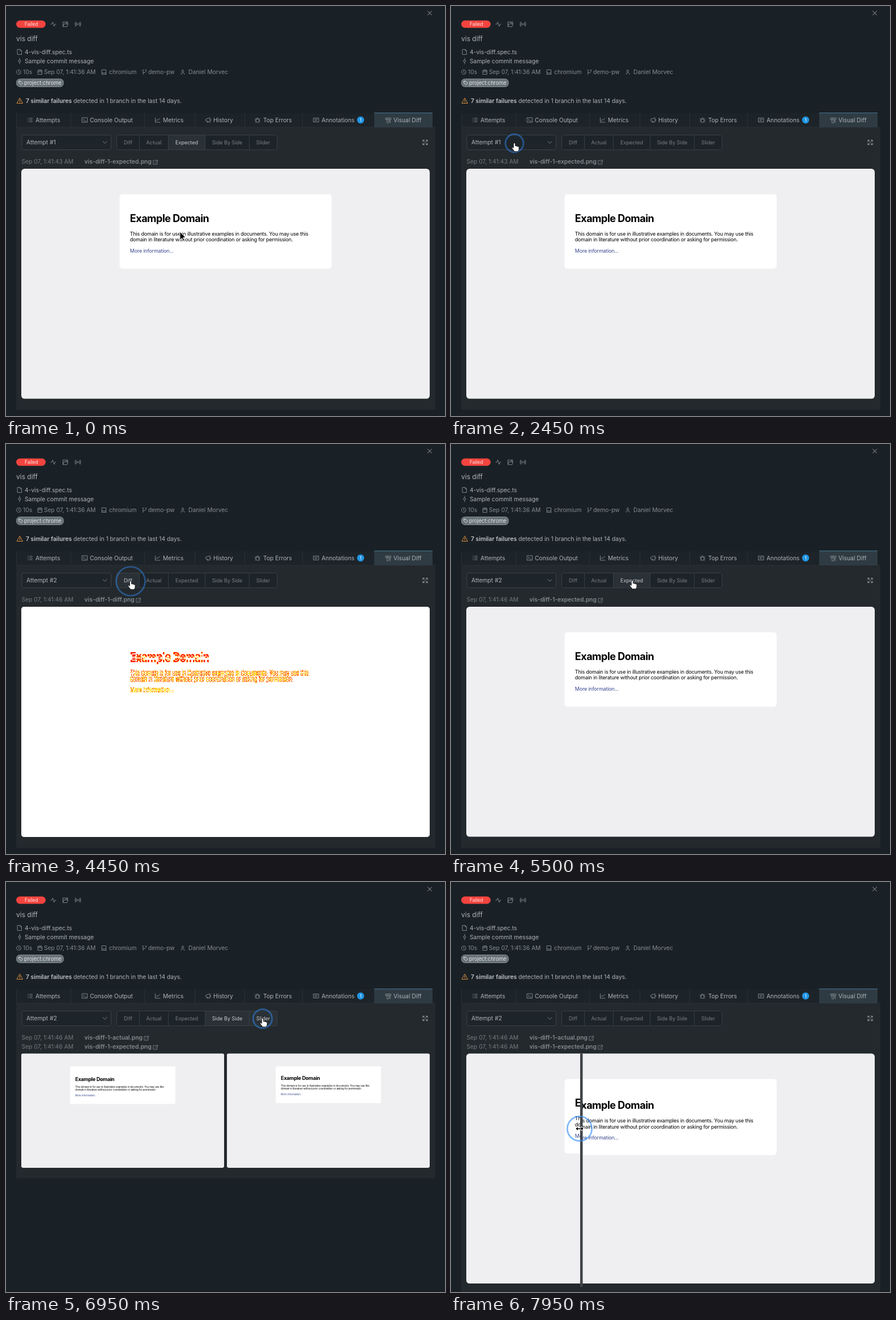
An HTML page with a canvas for the animation above (8 s loop, 775x723 px).

```html
<!DOCTYPE html>
<html lang="en">
<head>
<meta charset="utf-8">
<title>Visual diff</title>
<style>
html, body { margin: 0; width: 100%; height: 100%; overflow: hidden; background: #1a2126; }
#stage { position: relative; width: 775px; height: 723px; overflow: hidden; font: 10.3px Inter, sans-serif; }
#stage > svg, #diff { position: absolute; left: 0; top: 0; }
#diff { left: 27px; top: 287px; width: 721px; height: 405.6px; border-radius: 5px; background: #fff; }
svg text { white-space: pre; }
.ic path { fill: none; stroke: #7d8488; stroke-width: 1; stroke-linecap: round; stroke-linejoin: round; }
.label { position: absolute; left: 27.5px; height: 16px; line-height: 16px; color: #737a7e; white-space: pre; }
.label b { position: absolute; left: 111px; font-weight: 600; color: #858b8f; }
.label svg { vertical-align: -1.5px; margin-left: 2px; }
.btn text { font-size: 9px; text-anchor: middle; fill: #787e82; }
.btn rect { fill: #1d2429; }
.btn.lit text { fill: #c6cacc; }
.btn.lit rect { fill: #2a3136; }
</style>
</head>
<body>
<div id="stage">
<svg id="base" width="775" height="723">
  <rect width="775" height="723" fill="#1a2126"/>
  <rect x="18" y="189" width="735" height="26" fill="#1d2429"/>
  <rect id="panel" x="18" y="214" width="740" height="498" fill="#23292d"/>
  <path d="M18.500 189V214H758M114.500 189V214M244.500 189V214M333.500 189V214M421.500 189V214M523.500 189V214" fill="none" stroke="#2a3136"/>
  <rect x="650" y="188" width="103" height="26" fill="#2f3b43"/>
  <path d="M650 188.500H753" stroke="#457594"/>
  <rect x="18" y="25.500" width="52" height="13" rx="6.500" fill="#f4443f"/>
  <rect x="18.500" y="128.500" width="83" height="14" rx="6" fill="#687279" stroke="#828b91"/>
  <rect x="28" y="227.500" width="157.500" height="26" rx="3" fill="#1e252a" stroke="#3b4247"/>
  <circle cx="626" cy="201" r="6.200" fill="#2196e3"/>
  <g id="words"></g>
  <g id="icons" class="ic"></g>
  <g id="buttons"></g>
  <path d="M195.500 230.500a3 3 0 0 1 3-3H475.500a3 3 0 0 1 3 3V250.500a3 3 0 0 1-3 3H198.500a3 3 0 0 1-3-3ZM235.500 227.500v26M286.500 227.500v26M351.500 227.500v26M429.500 227.500v26" fill="none" stroke="#383f44"/>
  <defs>
    <g id="expected"></g>
    <g id="actual"></g>
    <clipPath id="leftPart"><rect id="leftBox" x="0" y="290" height="433"/></clipPath>
    <clipPath id="rightPart"><rect id="rightBox" y="290" width="775" height="433"/></clipPath>
  </defs>
  <use class="view v-expected" href="#expected" transform="translate(27 287) scale(.5633)"/>
  <use class="view v-actual" href="#actual" transform="translate(27 287) scale(.5633)"/>
  <g class="view v-side">
    <use href="#actual" transform="translate(27 302.500) scale(.2797)"/>
    <use href="#expected" transform="translate(390 302.500) scale(.2797)"/>
  </g>
  <g class="view v-slider">
    <g clip-path="url(#leftPart)"><use href="#expected" transform="translate(27 302.500) scale(.5633)"/></g>
    <g clip-path="url(#rightPart)"><use href="#actual" transform="translate(27 302.500) scale(.5633)"/></g>
    <rect id="bar" y="302.500" width="4.500" height="411.500" fill="#404447"/>
  </g>
</svg>
<canvas id="diff" class="view v-diff" width="1280" height="720"></canvas>
<div id="labels"></div>
<svg id="top" width="775" height="723">
  <g id="menu">
    <rect x="28" y="257" width="158" height="62" rx="3" fill="#2a3136"/>
    <rect id="opt" x="28" y="261" width="158" height="27" fill="#343c42"/>
    <text x="36" y="278" fill="#b4babe" font-size="10.3">Attempt #2</text>
    <text x="36" y="305" fill="#b4babe" font-size="10.3">Attempt #1</text>
  </g>
  <circle id="ring" fill="none" stroke="#2f8bf5" stroke-width="2.700"/>
  <g id="cursor" stroke-linejoin="round">
    <path class="c-arrow" d="M0 0V14.500L3.400 11.400 5.600 16.400 7.900 15.400 5.700 10.600H10.300Z" fill="#000" stroke="#fff"/>
    <path class="c-hand" d="M-1.600 1a1.500 1.500 0 0 1 3 0V5c.6-.8 2.200-.6 2.500.5 .8-.6 2-.3 2.200.7 .9-.4 1.900 0 1.900 1.300V10c0 2.500-1.300 2.800-1.400 4.600H-.2C-.8 12.500-3.300 10.500-4.200 8.800c-.6-1.300.8-2 1.700-1.200l.9 .9Z" fill="#fff" stroke="#111" stroke-width=".8"/>
    <g class="c-beam" fill="none">
      <path d="M-3-6.500Q0-6.500 0-5V5Q0 6.500-3 6.500M3-6.500Q0-6.500 0-5M0 5Q0 6.500 3 6.500M-2 1H2" stroke="#fff" stroke-width="2.600"/>
      <path d="M-3-6.500Q0-6.500 0-5V5Q0 6.500-3 6.500M3-6.500Q0-6.500 0-5M0 5Q0 6.500 3 6.500M-2 1H2" stroke="#111"/>
    </g>
    <path class="c-resize" d="M-7 0L-3-4V-1.200H3V-4L7 0 3 4V1.200H-3V4Z" fill="#000" stroke="#fff" stroke-width=".9"/>
  </g>
</svg>
</div>
<script>
const $ = id => document.getElementById(id);
const INK = '#adb3b7', DIM = '#858c90';

// x, baseline, text, colour, size, weight
const words = [
  [33, 35, 'Failed', '#ffe9e7', 8.4], [18, 62, 'vis diff', INK, 12],
  [33, 85, '4-vis-diff.spec.ts', INK], [33, 101, 'Sample commit message', INK],
  [30, 120, '10s', DIM], [67, 120, 'Sep 07, 1:41:36 AM', DIM], [182, 120, 'chromium', DIM],
  [251, 120, 'demo-pw', DIM], [322, 120, 'Daniel Morvec', DIM],
  [32, 138.6, 'project:chrome', '#e4e8ea', 9.2],
  [35, 171, '7 similar failures', '#bdc3c6', 10.3, 600],
  [119, 171, 'detected in 1 branch in the last 14 days.', INK],
  [52, 204.6, 'Attempts', INK], [148, 204.6, 'Console Output', INK], [277, 204.6, 'Metrics', INK],
  [366, 204.6, 'History', INK], [454, 204.6, 'Top Errors', INK], [557, 204.6, 'Annotations', INK],
  [624.5, 204, '1', '#fff', 8], [684, 205.4, 'Visual Diff', INK]
];
const text = ([x, y, s, fill, size = 10.3, weight = 400]) =>
  `<text x="${x}" y="${y}" fill="${fill}" font-size="${size}" font-weight="${weight}">${s}</text>`;
$('words').innerHTML = words.map(text).join('') +
  `<text id="attempt" x="36" y="244" fill="${INK}" font-size="10.3"></text>`;

// centre x, centre y, path in a box from -5 to 5, colour
const icons = [
  [748, 12.5, 'M-3.500-3.500L3.500 3.500M3.500-3.500L-3.500 3.500', '#9aa0a4'],
  [83.5, 32, 'M-4.500 0H-2.500L-1-4 1.500 4 3 0H4.500'],
  [105, 32, 'M-4.500 4V-4H-1L0-2.500H4V-1M-4.500 4L-2.500-.5H4.500L3 4ZM1-4H4'],
  [127, 32, 'M-1 0a1 1 0 1 0 2 0a1 1 0 1 0-2 0M-2.500-2.500Q-4 0-2.500 2.500M2.500-2.500Q4 0 2.500 2.500M-4-4Q-6.500 0-4 4M4-4Q6.500 0 4 4'],
  [24, 81, 'M-3.500-4.500H1L3.500-2V4.500H-3.500ZM1-4.500V-2H3.500'],
  [24, 97, 'M-2 0a2 2 0 1 0 4 0a2 2 0 1 0-4 0M0-5V-2M0 2V5'],
  [22.5, 116.5, 'M-4 0a4 4 0 1 0 8 0a4 4 0 1 0-8 0M0-2V.5L1.500 1.500'],
  [60, 116.5, 'M-3.500-3H3.500V4H-3.500ZM-3.500-.5H3.500M-1.500-4.500V-2M1.500-4.500V-2'],
  [173, 116.5, 'M-3.500-4H3.500V1.500H-3.500ZM-4 4H4M-3.500 1.500V4M3.500 1.500V4'],
  [244.5, 116.5, 'M-2.500-2.500V4M2.500-3V-1Q2.500 1-2.500 1.500M-3.500-3.500H-1.500M1.500-3.500H3.500'],
  [312, 116.5, 'M-1.700-2a1.700 1.700 0 1 0 3.400 0a1.700 1.700 0 1 0-3.400 0M-3 4Q-3 1 0 1T3 4'],
  [26, 135.5, 'M-3-3H0L3.500 .5 .5 3.500-3 0ZM-1.200-1.200V-1.200', '#dfe3e5'],
  [24.5, 167, 'M0-4.500L5 4.500H-5ZM0-1.500V1.500M0 3V3', '#d98b3d'],
  [42.5, 201, 'M-3.800-3H-3M-3.800 0H-3M-3.800 3H-3M-1-3H4M-1 0H4M-1 3H4'],
  [139, 201, 'M-4.500-4H4.500V4H-4.500ZM-2.500-1.500L-.5 0-2.500 1.500M.5 2H2.500'],
  [267.5, 201, 'M-4-4V4H4.500M-2.500 1.500L-.5-1 1 .5 4-3'],
  [357, 201, 'M-4-1.500L3-4V4L-4 1.500ZM-2 2V4H0M4.500-1V1'],
  [444, 201, 'M-2.500-1.500H2.500V2Q2.500 4.500 0 4.500T-2.500 2ZM-1.800-1.500Q-1.500-4 0-4T1.800-1.500M-4.500-2.500L-2.500-.5M4.500-2.500L2.500-.5M-4.500 1H-2.500M2.500 1H4.500M-4 4L-2.500 3M4 4L2.500 3'],
  [547.5, 201, 'M-4.500-3.500H4.500V3.500H-4.500ZM-2.500-1H2.500M-2.500 1H1'],
  [675, 201.5, 'M-4.500-4H4.500V-1H-4.500ZM-2-4V-1M1-4V-1M-2.500-1V4.500H1V-1M1 1H3.500V4.500'],
  [174.5, 240.5, 'M-3.500-1.700L0 1.700 3.500-1.700'],
  [740, 240.5, 'M-4-1.500V-4H-1.500M-4-4L-1-1M4-1.500V-4H1.500M4-4L1-1M-4 1.500V4H-1.500M-4 4L-1 1M4 1.500V4H1.500M4 4L1 1', '#9aa0a4']
];
$('icons').innerHTML = icons.map(([x, y, d, c]) =>
  `<path transform="translate(${x} ${y})" d="${d}" style="stroke:${c || ''}"/>`).join('');

const edges = [195.5, 235.5, 286.5, 351.5, 429.5, 478.5];
$('buttons').innerHTML = ['Diff', 'Actual', 'Expected', 'Side By Side', 'Slider'].map((s, i) =>
  `<g class="btn"><rect x="${edges[i]}" y="227.500" width="${edges[i + 1] - edges[i]}" height="26"/>` +
  `<text x="${(edges[i] + edges[i + 1]) / 2}" y="243.600">${s}</text></g>`).join('');
const buttons = [...document.querySelectorAll('.btn')];

// Screenshot page in its own 1280 x 720 space: baseline, text, font, letter spacing, colour
const LEFT = 340.5;
const lines = dy => [
  [166 + dy, 'Example Domain', '700 32px', -.9, '#000'],
  [209 + dy, 'This domain is for use in illustrative examples in documents. You may use this', '400 16px', -.34, '#000'],
  [228 + dy, 'domain in literature without prior coordination or asking for permission.', '400 16px', -.34, '#000'],
  [263 + dy * .75, 'More information...', '400 16px', -.34, '#38488f']
];
const page = dy => `<rect width="1280" height="720" rx="10" fill="#efeff1"/>
  <rect x="308" y="80" width="664.500" height="${233 + dy * .7}" rx="9" fill="#fff"/>` +
  lines(dy).map(([y, s, font, gap, c]) =>
    `<text x="${LEFT}" y="${y}" fill="${c}" style="font:${font} Inter,sans-serif;letter-spacing:${gap}px">${s}</text>`).join('');
$('expected').innerHTML = page(0);
$('actual').innerHTML = page(7);

// Pixel comparison of the two pages: strong changes red, soft edges yellow
function drawDiff() {
  const g = $('diff').getContext('2d', { willReadFrequently: true });
  const shot = dy => {
    g.fillStyle = '#fff';
    g.fillRect(0, 0, 1280, 720);
    for (const [y, s, font, gap, c] of lines(dy)) {
      g.font = font + ' Inter, sans-serif';
      g.letterSpacing = gap + 'px';
      g.fillStyle = c;
      g.fillText(s, LEFT, y);
    }
    return g.getImageData(330, 120, 640, 180);
  };
  const a = shot(0), b = shot(7), p = a.data, q = b.data;
  for (let i = 0; i < p.length; i += 4) {
    const d = Math.abs(p[i] - q[i]);
    const [r, gr, bl] = d > 190 ? [255, 20, 0] : d > 25 ? [255, 222, 0] : [255, 255, 255];
    p[i] = r; p[i + 1] = gr; p[i + 2] = bl;
  }
  g.fillStyle = '#fff';
  g.fillRect(0, 0, 1280, 720);
  g.putImageData(a, 330, 120);
}
drawDiff();

const linkIcon = '<svg class="ic" width="9" height="9" viewBox="-5 -5 10 10"><path d="M0-3.500H-4V4H3.500V0M1.500-4H4.500V-1M4.500-4L-.5 1"/></svg>';
function setLabels(names, sec) {
  $('labels').innerHTML = names.map((n, i) =>
    `<div class="label" style="top:${266 + i * 16}px">Sep 07, 1:41:${sec} AM<b>vis-diff-1-${n}.png${linkIcon}</b></div>`).join('');
}

const ARROW = 'arrow', HAND = 'hand', BEAM = 'beam', RESIZE = 'resize';
const path = [
  [100, 307, 398], [1300, 660, 264], [1700, 660, 264], [2350, 112, 242], [2600, 112, 242],
  [2900, 92, 277], [3650, 92, 277], [4080, 220, 242], [4500, 220, 242], [4690, 262, 242],
  [4850, 262, 242], [5040, 320, 241], [5550, 320, 241], [5820, 391, 241], [6250, 391, 241],
  [6800, 453, 241], [7020, 453, 241], [7450, 386, 435], [7700, 386, 435], [7950, 227, 435]
];
const clicks = [2400, 3000, 4100, 4700, 5050, 5850, 6880, 7750];
const views = [[0, 'expected'], [4300, 'diff'], [4800, 'actual'], [5150, 'expected'], [5950, 'side'], [7050, 'slider']];
const focus = [[0, 2], [950, -1], [4150, 0], [4750, 1], [5100, 2], [5900, 3], [6980, 4], [7700, -1]];
const clamp = v => Math.max(0, Math.min(1, v));
const ease = v => v * v * (3 - 2 * v);
const at = (list, t) => list.filter(e => e[0] <= t).pop()[1];

function position(t) {
  const i = path.findIndex(k => k[0] > t);
  if (i < 0) return path[path.length - 1].slice(1);
  if (!i) return path[0].slice(1);
  const [t0, x0, y0] = path[i - 1], [t1, x1, y1] = path[i];
  const k = ease((t - t0) / (t1 - t0));
  return [x0 + (x1 - x0) * k, y0 + (y1 - y0) * k];
}

let shown = '';
function draw(t) {
  const [x, y] = position(t);
  const view = at(views, t), second = t >= 3150;
  const menu = clamp((t - 2450) / 100) * clamp((3250 - t) / 100);

  const key = view + second;
  if (key !== shown) {
    shown = key;
    document.querySelectorAll('.view').forEach(v => {
      v.style.display = v.classList.contains('v-' + view) ? '' : 'none';
    });
    const pair = view === 'side' || view === 'slider';
    setLabels(pair ? ['actual', 'expected'] : [view], second ? 46 : 43);
    $('attempt').textContent = second ? 'Attempt #2' : 'Attempt #1';
    $('panel').setAttribute('height', view === 'side' ? 308.5 : view === 'slider' ? 520 : 498);
  }

  const inRow = y > 227 && y < 254;
  const over = inRow ? edges.findIndex((e, i) => x > e && x < edges[i + 1]) : -1;
  const held = at(focus, t);
  buttons.forEach((b, i) => b.classList.toggle('lit', i === over || i === held));

  const bar = t < 7700 ? 389 : x + 3;
  $('bar').setAttribute('x', bar - 2);
  $('leftBox').setAttribute('width', bar);
  $('rightBox').setAttribute('x', bar);

  $('menu').style.opacity = menu;
  $('opt').style.opacity = y > 258 ? 1 : .5;

  let type = ARROW;
  if (over >= 0 || inRow && x > 28 && x < 186 || menu > .2 && x < 186) type = HAND;
  else if (y > 266 && y < 284 && x < 268) type = BEAM;
  else if (view === 'slider' && y > 303 && Math.abs(x - bar) < 10) type = RESIZE;
  for (const c of $('cursor').children) c.style.display = c.classList.contains('c-' + type) ? '' : 'none';
  $('cursor').setAttribute('transform', `translate(${x} ${y})`);

  const age = t - (clicks.filter(c => c <= t).pop() ?? -1e4);
  const grow = clamp(age / 300);
  $('ring').setAttribute('cx', x);
  $('ring').setAttribute('cy', y);
  $('ring').setAttribute('r', 14 + 11.5 * grow);
  $('ring').style.opacity = (.45 + .25 * grow) * clamp((450 - age) / 150);
}

function frame(now) {
  draw(Math.floor(now % 8000 / 50) * 50);
  requestAnimationFrame(frame);
}
draw(0);
requestAnimationFrame(frame);
</script>
</body>
</html>
```
